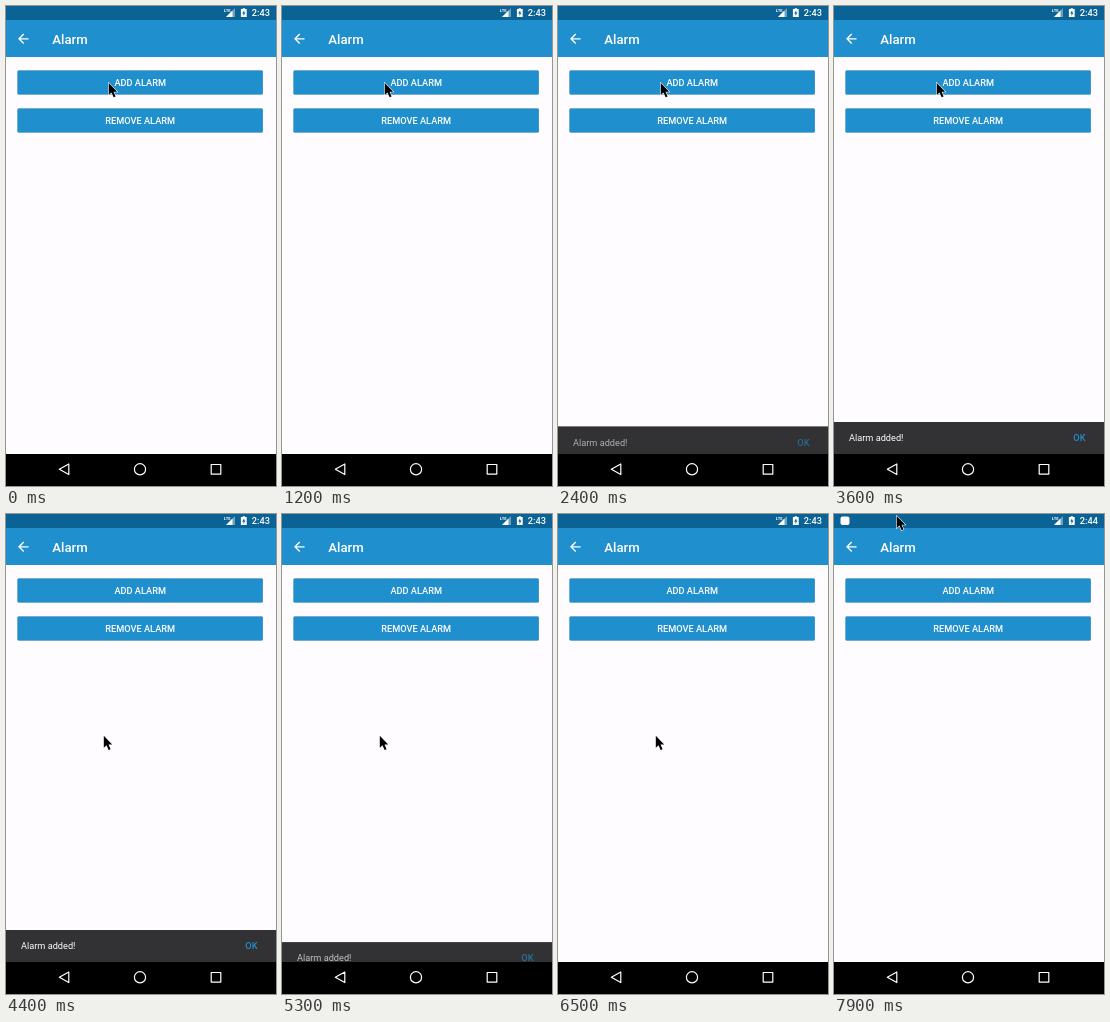
An HTML page for the animation above (8000 ms loop, 270 px wide and 480 px high).

```html
<!DOCTYPE html>
<html lang="en">
<head>
<meta charset="utf-8">
<title>Alarm</title>
<style>
  html, body { margin: 0; width: 100%; height: 100%; overflow: hidden; background: #fefcff; }
  svg { display: block; width: 270px; height: 480px; }
  text { font: 500 9.2px Roboto, sans-serif; fill: #fff; }
  .title { font-size: 13.2px; }
  .button { filter: drop-shadow(0 .7px .7px rgba(0, 0, 0, .4)); }
  .label { text-anchor: middle; }
  .message { font-weight: 400; }
</style>
</head>
<body>
<svg viewBox="0 0 270 480">
  <rect width="270" height="480" fill="#fefcff"/>
  <rect width="270" height="51" fill="#208fce"/>
  <rect width="270" height="14" fill="#0b6294"/>

  <rect id="notice" x="6.5" y="2.5" width="9" height="8.5" rx="2" fill="#fff"/>
  <path d="M229 2V11H220Z" fill="#fff" opacity=".4"/>
  <path d="M226.5 4.5V11H220Z" fill="#fff"/>
  <text x="217.8" y="5.6" style="font-size:4.2px;font-weight:700">LTE</text>
  <path d="M236.7 2.2h2.2v.9h1.8v8h-5.8v-8h1.8z" fill="#fff"/>
  <path d="M238.2 4.3v2.3h1.3l-2 3.4v-2.4h-1.3z" fill="#0b6294"/>
  <text id="clock" x="245.8" y="10.2">2:43</text>

  <path transform="translate(9.4 24.9) scale(.657)" fill="#fff"
    d="M20 11H7.83l5.59-5.59L12 4l-8 8 8 8 1.41-1.41L7.83 13H20z"/>
  <text class="title" x="46.3" y="37.6">Alarm</text>

  <g fill="#208fce">
    <rect id="add" class="button" x="11.5" y="64.5" width="245.3" height="24" rx="1.2"/>
    <rect class="button" x="11.5" y="102.5" width="245.3" height="24" rx="1.2"/>
  </g>
  <text class="label" x="134.2" y="79.9">ADD ALARM</text>
  <text class="label" x="134.2" y="117.9">REMOVE ALARM</text>

  <g id="snackbar">
    <rect y="416" width="270" height="32" fill="#323133"/>
    <g id="words">
      <text class="message" x="15" y="435.4">Alarm added!</text>
      <text x="239.3" y="435.4" style="fill:#208fce">OK</text>
    </g>
  </g>

  <rect y="448" width="270" height="32"/>
  <g fill="none" stroke="#fff" stroke-width="1.2" stroke-linejoin="round">
    <path d="M53.3 463.3L62.8 458V468.6Z"/>
    <circle cx="134" cy="463.3" r="5.6"/>
    <rect x="205.2" y="458.5" width="9.6" height="9.6"/>
  </g>

  <path id="cursor" d="M0 0V12L2.7 9.5L4.8 14.3L6.8 13.4L4.7 8.7H8.4Z"
    stroke="#fff" stroke-width="1.1" paint-order="stroke"/>
</svg>
<script>
const LOOP = 8000, SHOW = 2255, HIDE = 5225, SLIDE = 250;
const el = id => document.getElementById(id);
const ramp = (t, start, length) => Math.min(1, Math.max(0, (t - start) / length));
const smooth = x => x * x * (3 - 2 * x);
const mix = (a, b, k) => a + (b - a) * k;

// cubic-bezier(.4, 0, .2, 1)
function fastOutSlowIn(x) {
  let low = 0, high = 1, s = x;
  for (let i = 0; i < 20; i++) {
    s = (low + high) / 2;
    const bx = 1.2 * s * (1 - s) ** 2 + .6 * s * s * (1 - s) + s ** 3;
    if (bx < x) low = s; else high = s;
  }
  return s * s * (3 - 2 * s);
}

function cursorAt(t) {
  const down = smooth(ramp(t, 3900, 500));
  const up = smooth(ramp(t, 7400, 450));
  const bend = 10 * Math.sin(Math.PI * up);
  return [mix(mix(102.8, 97.8, down), 62.8, up) - bend,
          mix(mix(77, 221.8, down), 2, up)];
}

function draw(t) {
  const lift = smooth(ramp(t, 2000, 100)) - smooth(ramp(t, 2280, 150));
  el("add").style.filter =
    `drop-shadow(0 ${mix(.7, 1, lift)}px ${mix(.7, 1.7, lift)}px rgba(0,0,0,${mix(.4, .55, lift)}))`;

  const shown = fastOutSlowIn(ramp(t, SHOW, SLIDE)) - fastOutSlowIn(ramp(t, HIDE, SLIDE));
  el("snackbar").setAttribute("transform", `translate(0 ${32 * (1 - shown)})`);
  el("words").setAttribute("opacity", ramp(t, SHOW + 30, 190) - ramp(t, HIDE, SLIDE));

  el("clock").textContent = t < 6600 ? "2:43" : "2:44";
  el("notice").setAttribute("opacity", ramp(t, 6900, 150));
  el("cursor").setAttribute("transform", `translate(${cursorAt(t)})`);
}

function tick() {
  draw(performance.now() % LOOP);
  requestAnimationFrame(tick);
}
tick();
</script>
</body>
</html>
```
